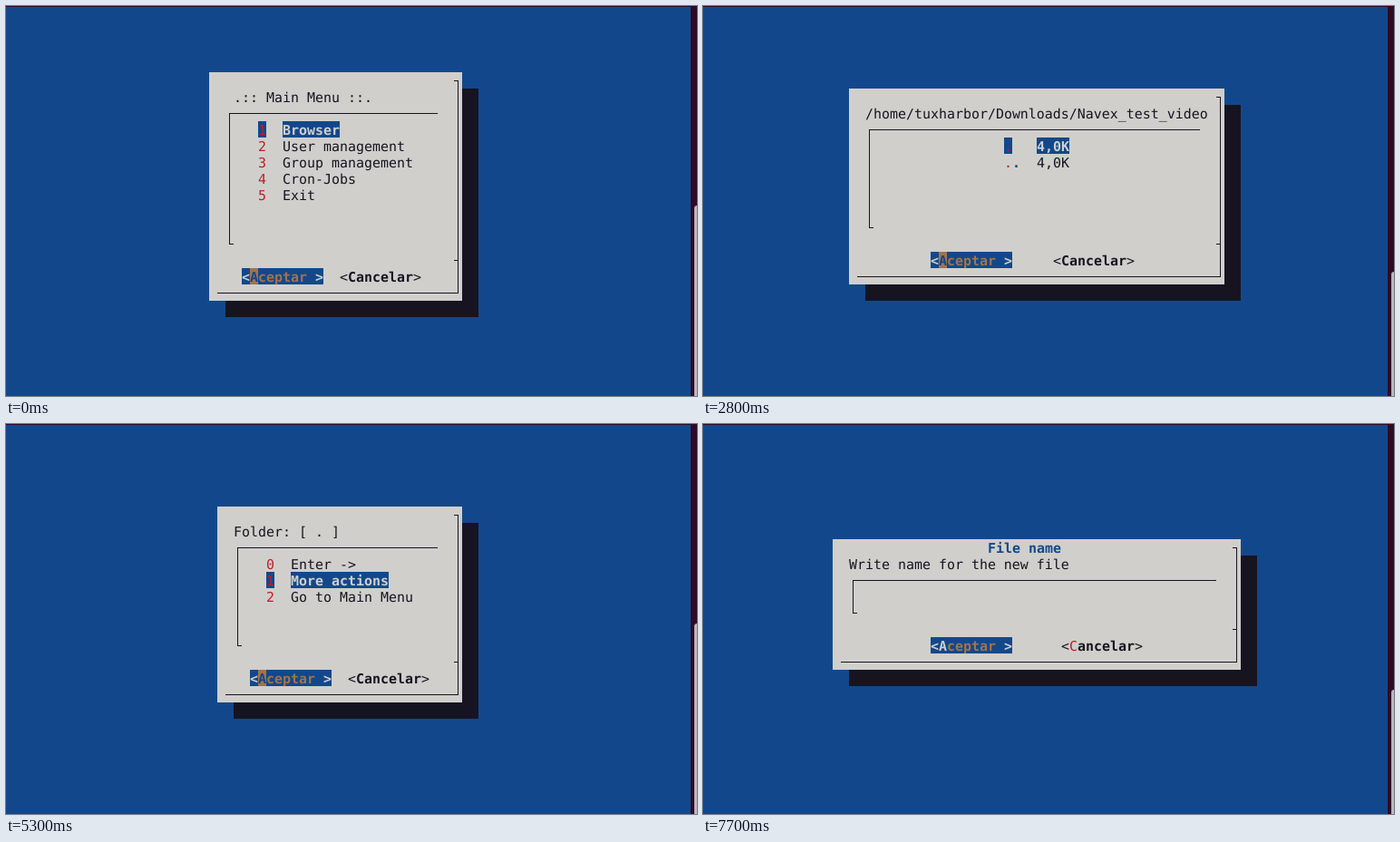
These frames come from a looping animation (762 px wide and 430 px high, 8 s). An HTML page:

```html
<!DOCTYPE html>
<html lang="en">
<head>
<meta charset="utf-8">
<title>Terminal menu</title>
<style>
  html, body { margin: 0; width: 100%; height: 100%; overflow: hidden; background: #12488b; }
  svg { display: block; width: 762px; height: 430px; }
  rect { shape-rendering: crispEdges; }
  .thumb { shape-rendering: auto; }
  text {
    font: 14.95px "DejaVu Sans Mono", monospace;
    white-space: pre;
    text-rendering: geometricPrecision;
  }
  .bold { font-weight: bold; }
</style>
</head>
<body>
<svg viewBox="0 0 762 430">
  <rect width="762" height="430" fill="#12488b"/>
  <rect width="762" height="1" fill="#300a24"/>
  <rect x="755" width="7" height="430" fill="#300a24"/>
  <rect id="thumb" class="thumb" x="759" width="8" rx="3" fill="#bdb6b9"/>
  <g id="dialog"></g>
</svg>
<script>
const BLUE = '#12488b', GRAY = '#d0cfcc', DARK = '#171421', RED = '#c01c28', BROWN = '#a2734c';
const CELL_W = 9, CELL_H = 18, LOOP = 8000;
const px = col => col * CELL_W - 1;
const py = row => row * CELL_H + 1;

// Positions and sizes are in character cells.
const dialogs = {
  main: {
    col: 25, row: 4, w: 31, h: 14, text: ' .:: Main Menu ::.', tagCol: 31, gap: 3, buttons: [29, 41],
    items: [['1', 'Browser'], ['2', 'User management'], ['3', 'Group management'], ['4', 'Cron-Jobs'], ['5', 'Exit']]
  },
  browser: {
    col: 18, row: 5, w: 46, h: 12, text: '/home/tuxharbor/Downloads/Navex_test_video',
    tagCol: 37, gap: 4, buttons: [28, 43], items: [['.', '4,0K'], ['..', '4,0K']]
  },
  folder: {
    col: 26, row: 5, w: 30, h: 12, text: 'Folder: [ . ]', tagCol: 32, gap: 3, buttons: [30, 42],
    items: [['0', 'Enter ->'], ['1', 'More actions'], ['2', 'Go to Main Menu']]
  },
  options: {
    col: 24, row: 4, w: 33, h: 15, text: 'Folder options', tagCol: 30, gap: 3, buttons: [28, 40],
    items: [['0', 'Create File/Folder'], ['1', 'Find'], ['2', 'Copy'], ['3', 'Move/Rename'], ['4', 'Delete!'], ['5', 'Exit']]
  },
  create: {
    col: 26, row: 5, w: 30, h: 12, text: 'Create New', tagCol: 36, gap: 3, buttons: [30, 42],
    items: [['0', 'File'], ['1', 'Folder'], ['2', 'Exit']]
  },
  fileName: {
    col: 16, row: 7, w: 50, h: 8, title: 'File name', text: 'Write name for the new file',
    buttons: [28, 44], input: [19, 10], items: []
  }
};

// Each step changes only the listed parts of the state.
const steps = [
  [0, { name: 'main', cursor: true, selected: 0, thumbTop: 220 }],
  [200, { cursor: false }],
  [800, { cursor: true }],
  [1400, { cursor: false }],
  [1600, { cursor: true }],
  [1700, { name: 'browser', thumbTop: 293 }],
  [2200, { cursor: false }],
  [2800, { cursor: true }],
  [3400, { cursor: false }],
  [3900, { cursor: true }],
  [4000, { name: 'folder', thumbTop: 331 }],
  [4500, { cursor: false }],
  [5000, { cursor: true }],
  [5100, { selected: 1 }],
  [5300, { thumbTop: 220 }],
  [5400, { name: 'options', selected: 0 }],
  [5900, { cursor: false }],
  [6300, { cursor: true }],
  [6400, { name: 'create' }],
  [7000, { cursor: false }],
  [7100, { cursor: true, thumbTop: 293 }],
  [7200, { name: 'fileName' }],
  [7700, { cursor: false }]
];

const escapeText = s => s.replace(/&/g, '&amp;').replace(/</g, '&lt;').replace(/>/g, '&gt;');
const rect = (x, y, w, h, fill) => `<rect x="${x}" y="${y}" width="${w}" height="${h}" fill="${fill}"/>`;
const block = (col, row, w, h, fill) => rect(px(col), py(row), w * CELL_W, h * CELL_H, fill);

function print(col, row, string, { color = DARK, bold = false, back } = {}) {
  const fill = back ? block(col, row, string.length, 1, back) : '';
  return `${fill}<text x="${px(col)}" y="${py(row) + 15}" fill="${color}"${bold ? ' class="bold"' : ''}>${escapeText(string)}</text>`;
}

function frame({ col, row, w, h }) {
  const right = px(col + w - 1) + 4, top = py(row) + 9, bottom = py(row + h - 1) + 9;
  const divider = py(row + h - 3) + 9;
  const left = px(col + 2) + 4, innerTop = py(row + 2) + 9, innerBottom = py(row + h - 4) + 9;
  const outerLeft = px(col + 1), innerRight = px(col + w - 3);
  return block(col + 2, row + 1, w, h, DARK) + block(col, row, w, h, GRAY)
    + rect(right, top, 1, bottom - top + 1, DARK)
    + rect(right - 4, top, 5, 1, DARK)
    + rect(right - 4, divider, 5, 1, DARK)
    + rect(outerLeft, bottom, right - outerLeft + 1, 1, DARK)
    + rect(left, innerTop, 1, innerBottom - innerTop + 1, DARK)
    + rect(left, innerTop, innerRight - left, 1, DARK)
    + rect(left, innerBottom, 5, 1, DARK);
}

function menuItem([tag, label], index, d, selected) {
  const row = d.row + 3 + index, active = index === selected;
  const back = active ? BLUE : undefined;
  return print(d.tagCol, row, tag[0], { color: RED, back })
    + (tag[1] ? print(d.tagCol + 1, row, tag[1], { color: BLUE, bold: true }) : '')
    + print(d.tagCol + d.gap, row, label, { color: active ? GRAY : DARK, bold: active, back });
}

function buttons(d, cursor) {
  const row = d.row + d.h - 2, [ok, cancel] = d.buttons;
  const onKey = cursor && !d.input;
  return block(ok, row, 10, 1, BLUE)
    + print(ok, row, '<', { color: GRAY, bold: true })
    + print(ok + 1, row, 'A', { color: onKey ? BLUE : d.input ? GRAY : BROWN, bold: true, back: onKey ? BROWN : BLUE })
    + print(ok + 2, row, 'ceptar', { color: BROWN, bold: true })
    + print(ok + 9, row, '>', { color: GRAY, bold: true })
    + print(cancel, row, '<')
    + print(cancel + 1, row, 'C', d.input ? { color: RED } : { bold: true })
    + print(cancel + 2, row, 'ancelar', { bold: true })
    + print(cancel + 9, row, '>');
}

function render({ name, cursor, selected, thumbTop }) {
  const d = dialogs[name];
  let out = frame(d) + print(d.col + 2, d.row + 1, d.text);
  if (d.title) {
    const col = d.col + Math.floor((d.w - d.title.length) / 2) - 1;
    out += print(col, d.row, d.title, { color: BLUE, bold: true });
  }
  out += d.items.map((item, i) => menuItem(item, i, d, selected)).join('') + buttons(d, cursor);
  if (d.input && cursor) out += block(...d.input, 1, 1, DARK);
  document.getElementById('dialog').innerHTML = out;
  const thumb = document.getElementById('thumb');
  thumb.setAttribute('y', thumbTop);
  thumb.setAttribute('height', 436 - thumbTop);
}

let shown = -1;
const start = performance.now();

function tick() {
  const time = Math.max(0, performance.now() - start) % LOOP;
  const current = steps.filter(([at]) => at <= time).length;
  if (current !== shown) {
    shown = current;
    render(Object.assign({}, ...steps.slice(0, current).map(([, change]) => change)));
  }
  requestAnimationFrame(tick);
}
tick();
</script>
</body>
</html>
```
